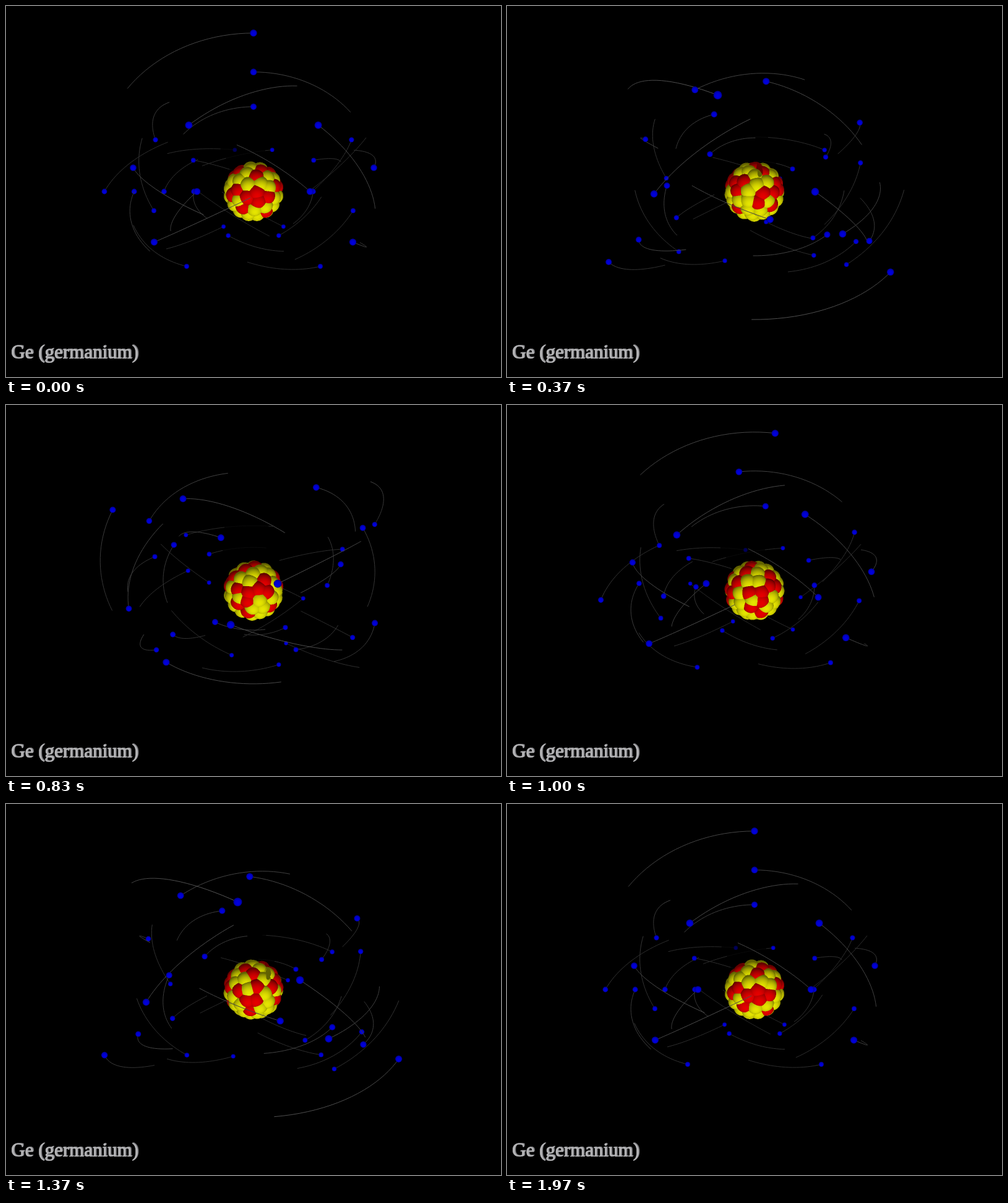
An HTML page with a canvas that plays this animation: 800 px wide and 600 px high, repeating every 2 s.

```html
<!DOCTYPE html>
<html lang="en">
<head>
<meta charset="utf-8">
<title>Ge (germanium)</title>
<style>
  html, body { margin: 0; width: 100%; height: 100%; overflow: hidden; background: #000; }
  canvas { position: absolute; left: 0; top: 0; }
  p {
    position: absolute; left: 8px; top: 542px; margin: 0;
    font: 31px/36px "Liberation Serif", Times, serif;
    white-space: pre; color: #b4b4b6;
    -webkit-text-stroke: .6px #b4b4b6;
    text-shadow: 1px 0 #8c8c8f, 1px -1px #848487, 2px -1px #5c5c5f;
  }
</style>
</head>
<body>
<canvas id="stage" width="800" height="600"></canvas>
<p>Ge (germanium)</p>
<script>
const ctx = document.getElementById('stage').getContext('2d');
const { sin, cos, sqrt, max, min, PI, hypot } = Math;
const TAU = 2 * PI, RAD = PI / 180;

const UNIT = 48.2;             // shells lie at 2 to 5 units
const EYE = 600;               // camera distance
const TILT_C = 0.8165, TILT_S = 0.5774;
const STEPS = 59;

// World (right, up, front) to camera (right, up, towards the eye) and back
const toCam = ([x, y, z]) => [x, y * TILT_C - z * TILT_S, y * TILT_S + z * TILT_C];
const toWorld = ([x, u, w]) => [x, u * TILT_C + w * TILT_S, w * TILT_C - u * TILT_S];
const dot = (a, b) => a[0] * b[0] + a[1] * b[1] + a[2] * b[2];
const unit = v => { const l = hypot(...v); return v.map(c => c / l); };
const spin = ([x, y, z], a) => [x * cos(a) + z * sin(a), y, z * cos(a) - x * sin(a)];
const LIGHT = toCam(unit([0.085, 0.06, 0.99]));

function project([x, u, w]) {
  const s = EYE / (EYE - w);
  return { x: 400 + x * s, y: 300 - u * s, s };
}

function inShadow(p) {
  const d = dot(p, LIGHT);
  return d < 0 && dot(p, p) - d * d < UNIT * UNIT;
}

// ---------- electrons ----------
const BALL = 4.4, TRAIL = 45 * RAD, PARTS = 20;
const shells = [
  { count: 2, phase: 90, dir: 1 },
  { count: 8, phase: 135, dir: -1 },
  { count: 18, phase: 100, dir: 1 },
  { count: 4, phase: 90, dir: -1 }
];
const electrons = shells.flatMap(({ count, phase, dir }, n) =>
  Array.from({ length: count }, (_, i) => ({
    r: UNIT * (n + 2), tilt: PI * i / count, phase: phase * i * RAD, dir
  })));

// Point on an orbit that is tipped about x, then turned about z
function orbit(e, angle) {
  const c = cos(e.tilt), s = sin(e.tilt);
  const x = -cos(angle), z = -sin(angle);
  const y = z * s;
  return toCam([x * c - y * s, x * s + y * c, z * c].map(v => v * e.r));
}

function drawTrail(e, head, front) {
  let a = orbit(e, head);
  for (let i = 1; i <= PARTS; i++) {
    const b = orbit(e, head - e.dir * TRAIL * i / PARTS);
    if (a[2] + b[2] > 0 === front) {
      const p = project(a), q = project(b);
      const lum = 54 * p.s * (inShadow(a) ? 0.25 : 1) | 0;
      ctx.strokeStyle = `rgb(${lum},${lum},${lum})`;
      ctx.beginPath();
      ctx.moveTo(p.x, p.y);
      ctx.lineTo(q.x, q.y);
      ctx.stroke();
    }
    a = b;
  }
}

function drawBall(pos) {
  const { x, y, s } = project(pos), r = BALL * s;
  const g = ctx.createRadialGradient(x, y + r * 0.35, 0, x, y, r);
  const k = inShadow(pos) ? 0.42 : 1;
  g.addColorStop(0, `rgb(0,0,${225 * k | 0})`);
  g.addColorStop(0.6, `rgb(0,0,${208 * k | 0})`);
  g.addColorStop(1, `rgb(0,0,${145 * k | 0})`);
  ctx.fillStyle = g;
  ctx.beginPath();
  ctx.arc(x, y, r, 0, TAU);
  ctx.fill();
}

// ---------- nucleus ----------
const GRAIN = 13.2, CORE = 35.6, TOTAL = 73;

// Protons near the middle of the screen at three turns of the nucleus
const views = [
  [0, [-29,-3, -40,7, -26,12, -12,10, 6,1, 9,17, 27,9, -20,30, 24,38]],
  [25, [20,-19, -29,-2, -9,3, 9,-3, 25,2, -12,18, -30,23, 32,29, -10,41]],
  [41, [-16,-37, -1,-28, -26,1, 6,-5, -42,4, -12,19, 4,18, -6,38, 34,9]]
];

function buildNucleus() {
  const reds = [];
  for (const [step, xy] of views) {
    for (let i = 0; i < xy.length; i += 2) {
      const x = xy[i] / 1.06, u = -xy[i + 1] / 1.06;
      const w = sqrt(max(0, 45 * 45 - x * x - u * u));
      const p = spin(unit(toWorld([x, u, w])), -TAU * step / STEPS);
      if (reds.every(q => dot(p, q) < cos(0.33))) reds.push(p);
    }
  }
  const n = TOTAL - reds.length;
  const yellows = Array.from({ length: n }, (_, i) => {
    const y = 1 - (2 * i + 1) / n, r = sqrt(1 - y * y), a = i * 2.39996;
    return [r * cos(a), y, r * sin(a)];
  });
  // Neutrons push each other into the gaps between the protons
  for (let round = 0; round < 200; round++) {
    yellows.forEach((p, i) => {
      const push = [0, 0, 0];
      for (const q of [...reds, ...yellows]) {
        if (q === p) continue;
        const d = p.map((c, j) => c - q[j]);
        const f = 1 / (hypot(...d) ** 4 + 1e-4);
        d.forEach((c, j) => push[j] += c * f);
      }
      const step = min(0.002, 0.05 / hypot(...push));
      yellows[i] = unit(p.map((c, j) => c + push[j] * step));
    });
  }
  return [...reds.map(p => ({ p, green: 0 })), ...yellows.map(p => ({ p, green: 1 }))];
}

const nucleons = buildNucleus();
const SIZE = 108, FINE = 2, W = SIZE * FINE;
const layer = document.createElement('canvas');
layer.width = layer.height = W;
const layerCtx = layer.getContext('2d');
const image = layerCtx.createImageData(W, W);
const depth = new Float32Array(W * W);

function drawNucleus(angle, balls) {
  image.data.fill(0);
  depth.fill(-1e9);
  const casters = balls.filter(b => {
    const d = dot(b, LIGHT);
    return d > 0 && dot(b, b) - d * d < 54 * 54;
  });
  for (const { p, green } of nucleons) {
    const c = toCam(spin(p, angle).map(v => v * CORE));
    if (c[2] < -25) continue;
    const { x, y, s } = project(c);
    const cx = (x - 400 + SIZE / 2) * FINE, cy = (y - 300 + SIZE / 2) * FINE;
    const r = GRAIN * s * FINE;
    for (let py = max(0, cy - r | 0); py < min(W, cy + r + 1); py++) {
      for (let px = max(0, cx - r | 0); px < min(W, cx + r + 1); px++) {
        const nx = (px + 0.5 - cx) / r, ny = (cy - py - 0.5) / r;
        const rest = 1 - nx * nx - ny * ny;
        if (rest < 0) continue;
        const nz = sqrt(rest), z = c[2] + GRAIN * nz, at = py * W + px;
        if (z <= depth[at]) continue;
        depth[at] = z;
        let lit = max(0, nx * LIGHT[0] + ny * LIGHT[1] + nz * LIGHT[2]);
        for (const b of casters) {
          const q = [b[0] - c[0] - GRAIN * nx, b[1] - c[1] - GRAIN * ny, b[2] - z];
          const d = dot(q, LIGHT);
          if (dot(q, q) - d * d < BALL * BALL) lit = 0;
        }
        const v = 255 * (0.38 + 0.52 * lit);
        image.data[at * 4] = v;
        image.data[at * 4 + 1] = v * green;
        image.data[at * 4 + 3] = 255;
      }
    }
  }
  layerCtx.putImageData(image, 0, 0);
  ctx.drawImage(layer, 400 - SIZE / 2, 300 - SIZE / 2, SIZE, SIZE);
}

// ---------- playback ----------
function drawStep(step) {
  const turn = TAU * step / STEPS;
  const heads = electrons.map(e => e.phase + e.dir * 2 * turn);
  const balls = electrons.map((e, i) => orbit(e, heads[i]));
  const sorted = [...balls].sort((a, b) => a[2] - b[2]);

  ctx.fillStyle = '#000';
  ctx.fillRect(0, 0, 800, 600);
  ctx.lineWidth = 1;
  for (const front of [false, true]) {
    if (front) drawNucleus(turn, balls);
    electrons.forEach((e, i) => drawTrail(e, heads[i], front));
    sorted.filter(b => b[2] > 0 === front).forEach(drawBall);
  }
}

let shown = -1;
function tick() {
  const t = performance.now() % 2000, part = t % 100;
  const step = 3 * Math.floor(t / 100) + (part >= 30) + (part >= 70);
  if (step !== shown) drawStep(shown = step);
  requestAnimationFrame(tick);
}
tick();
</script>
</body>
</html>
```
